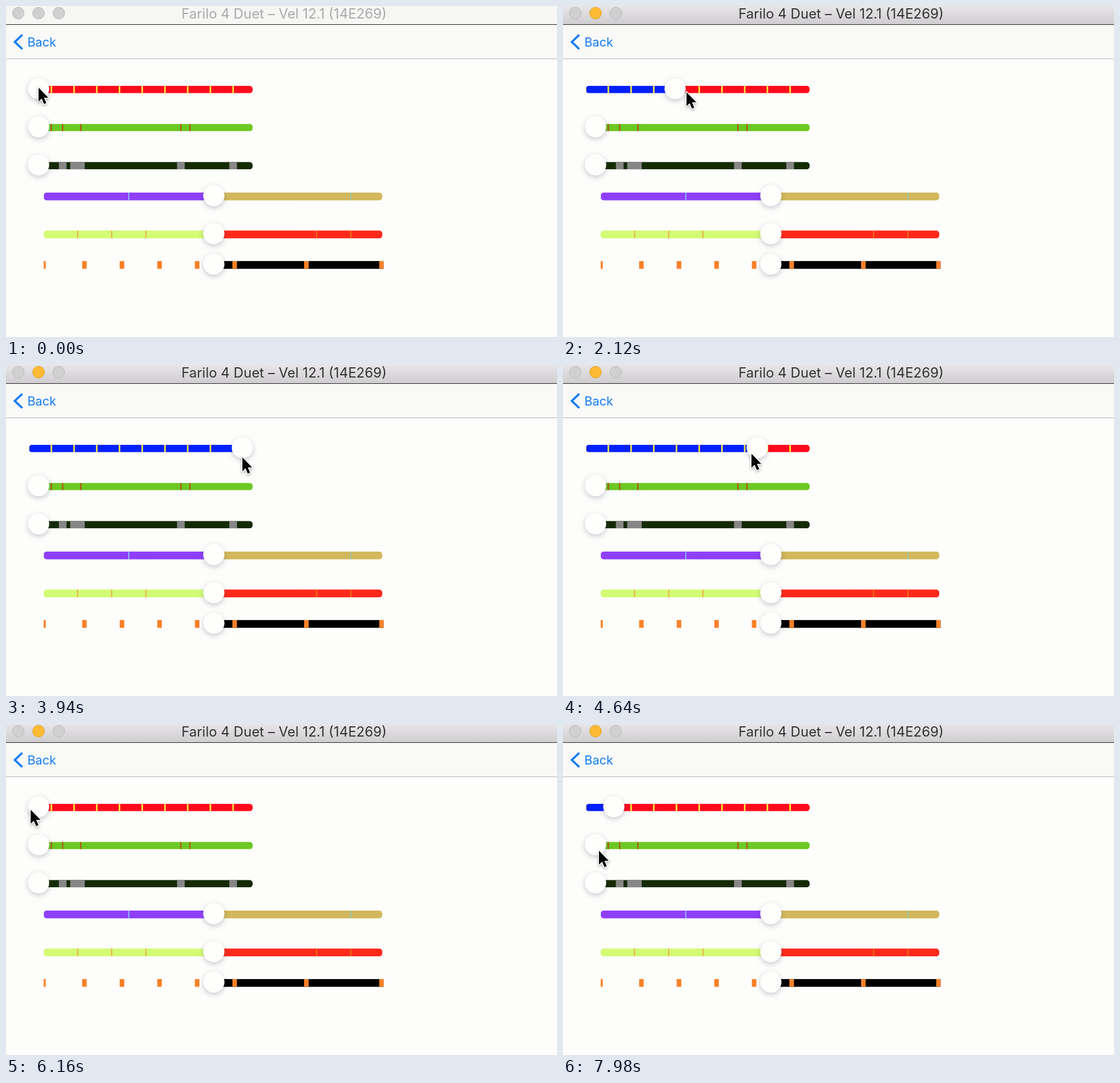
These frames come from a looping animation (965 by 580 pixels, 8000 ms). An HTML page:

```html
<!DOCTYPE html>
<html lang="en">
<head>
<meta charset="utf-8">
<title>Tick sliders</title>
<style>
  html, body { margin: 0; width: 100%; height: 100%; overflow: hidden; background: #fdfdfb; }
  svg { display: block; }
  text { font-family: Inter, Roboto, sans-serif; }
  .thumb { fill: #fefefd; filter: drop-shadow(0 3px 5px rgba(60, 60, 100, .28)); }
  .cursor { fill: #000; stroke: #fff; stroke-width: 3; stroke-linejoin: round; paint-order: stroke;
            filter: drop-shadow(0 2px 2px rgba(0, 0, 0, .3)); }
</style>
</head>
<body>
<svg width="965" height="580" viewBox="0 0 965 580">
  <defs>
    <linearGradient id="activeBar" x2="0" y2="1">
      <stop stop-color="#e7e5e7"/><stop offset="1" stop-color="#cfcdd0"/>
    </linearGradient>
  </defs>
  <rect width="965" height="580" fill="#fdfdfb"/>
  <rect id="bar" width="965" height="32"/>
  <g fill="#d0d0d0" stroke="#b9b9b9">
    <circle cx="21.5" cy="12.5" r="10.3"/>
    <circle id="minimise" cx="57" cy="12.5" r="10.3"/>
    <circle cx="92.5" cy="12.5" r="10.3"/>
  </g>
  <text id="title" x="487" y="21.5" font-size="24" text-anchor="middle">Farilo 4 Duet – Vel 12.1 (14E269)</text>
  <rect y="33" width="965" height="59" fill="#f9f9f8"/>
  <rect y="32" width="965" height="1" fill="#222"/>
  <rect y="92" width="965" height="1" fill="#b2b2b6"/>
  <path d="M28.5 50.5 L15.5 63 L28.5 75.5" fill="none" stroke="#127cf3" stroke-width="3.8"/>
  <text x="37.5" y="70.5" font-size="21.5" fill="#127cf3">Back</text>
  <g id="sliders"></g>
  <path id="cursor" class="cursor" d="M0 0 V24.5 L5.5 19.3 L9.6 28.8 L13.6 27 L9.6 17.8 H17.2 Z"/>
</svg>
<script>
const LOOP = 8000;
const ACTIVATE = 960;
const THUMB_MIN = 57, THUMB_MAX = 414;
const byId = id => document.getElementById(id);

function add(parent, tag, attrs) {
  const el = document.createElementNS('http://www.w3.org/2000/svg', tag);
  for (const key in attrs) el.setAttribute(key, attrs[key]);
  parent.append(el);
  return el;
}

const SHORT = { x: 40, end: 432, height: 13, span: 398, value: THUMB_MIN };
const LONG = { x: 66, end: 659, height: 14, span: 598, value: 364 };

// Ticks are fractions of the span; they may differ in colour on either side of the thumb.
function slider({ x, end, height, span, value }, y, { min, max, ticks, size, minTick, maxTick = minTick, radius = 5.5 }) {
  const group = add(byId('sliders'), 'g', {});
  const clip = add(group, 'clipPath', { id: 'track' + y });
  add(clip, 'rect', { x, y, width: end - x, height, rx: radius });
  const track = add(group, 'g', { 'clip-path': `url(#track${y})` });
  const bar = (left, width, fill) => add(track, 'rect', { x: left, y, width, height, fill });
  const filled = bar(x, value - x, min);
  const rest = bar(value, end - value, max);
  for (const part of ticks) {
    const centre = x - 0.4 + part * span;
    bar(centre - size / 2, size, centre < value ? minTick : maxTick);
  }
  const thumb = add(group, 'circle', { class: 'thumb', cx: value, cy: y + height / 2 - 1.5, r: 18.6 });
  return position => {
    thumb.setAttribute('cx', position);
    filled.setAttribute('width', position - x);
    rest.setAttribute('x', position);
    rest.setAttribute('width', end - position);
  };
}

const tenths = Array.from({ length: 10 }, (_, i) => i / 10);

const moveThumb = slider(SHORT, 139.8, { min: '#0520ff', max: '#ff0a1c', ticks: tenths, size: 2.7, minTick: '#ffee3c' });
slider(SHORT, 206.5, { min: '#6cc822', max: '#6cc822', ticks: [.1, .15, .23, .67, .71], size: 1.8, minTick: '#c53a12' });
slider(SHORT, 273.3, { min: '#142a04', max: '#142a04', ticks: [.15, .2, .23, .67, .9], size: 13.4, minTick: '#868686' });
slider(LONG, 326.7, { min: '#8f3ffa', max: '#d2b85c', ticks: [0, .25, .9], size: 1.8, minTick: '#8cc4fa', maxTick: '#8cc8b4' });
slider(LONG, 393.3, { min: '#d3fb74', max: '#ff291b', ticks: [.1, .2, .3, .8, .9], size: 1.7, minTick: '#f0a537', maxTick: '#e08018' });
slider({ ...LONG, end: 661.5 }, 446.7, {
  min: 'none', max: '#000', ticks: [0, .12, .23, .34, .45, .56, .77, .99], size: 8, minTick: '#fb8129', radius: 0
});

// Pictures are held for 20, 20 and 100 ms in turn, but motion advances evenly per picture.
function evenTime(time) {
  const shifted = time + 20, rest = shifted % 140;
  const picture = Math.floor(shifted / 140) * 3 + (rest < 20 ? 0 : rest < 40 ? 1 : 2);
  return Math.max(0, (picture * 140 - 220) / 3);
}

const mix = (a, b, p) => a + (b - a) * p;
const smooth = p => p * p * (3 - 2 * p);

// grab: how far right of the thumb's centre the pointer holds it
const drags = [
  { start: 1320, end: 3370, from: THUMB_MIN, to: THUMB_MAX, grab: 20 },
  { start: 4298, end: 5950, from: THUMB_MAX, to: THUMB_MIN, grab: -10 },
  { start: 6300, end: 6720, from: THUMB_MIN, to: 89, grab: -17 }
];
const enter = { time: 0, x: 57, y: 143 };
const leave = { time: 7940, x: 63, y: 222 };

function held(thumb, grab) {
  return { thumb, x: thumb + grab, y: 150.3 + 10 * (thumb / 400) ** 4 };
}

function pose(time) {
  let last = { ...enter, thumb: THUMB_MIN };
  for (const { start, end, from, to, grab } of drags) {
    if (time < start) return glide(last, { ...held(from, grab), time: start }, time);
    if (time < end) return held(mix(from, to, (time - start) / (end - start)), grab);
    last = { ...held(to, grab), time: end };
  }
  return glide(last, leave, time);
}

function glide(a, b, time) {
  const p = smooth(Math.min(1, (time - a.time) / (b.time - a.time)));
  return { thumb: a.thumb, x: mix(a.x, b.x, p), y: mix(a.y, b.y, p) };
}

function draw(time) {
  const active = time >= ACTIVATE;
  byId('bar').setAttribute('fill', active ? 'url(#activeBar)' : '#f6f6f5');
  byId('title').setAttribute('fill', active ? '#333' : '#a9a9a9');
  byId('minimise').setAttribute('fill', active ? '#fdbb35' : '#d0d0d0');
  byId('minimise').setAttribute('stroke', active ? '#dfa023' : '#b9b9b9');
  const { thumb, x, y } = pose(evenTime(time));
  moveThumb(thumb);
  byId('cursor').setAttribute('transform', `translate(${x} ${y})`);
}

const started = performance.now();
function tick() {
  draw((performance.now() - started) % LOOP);
  requestAnimationFrame(tick);
}
tick();
</script>
</body>
</html>
```
